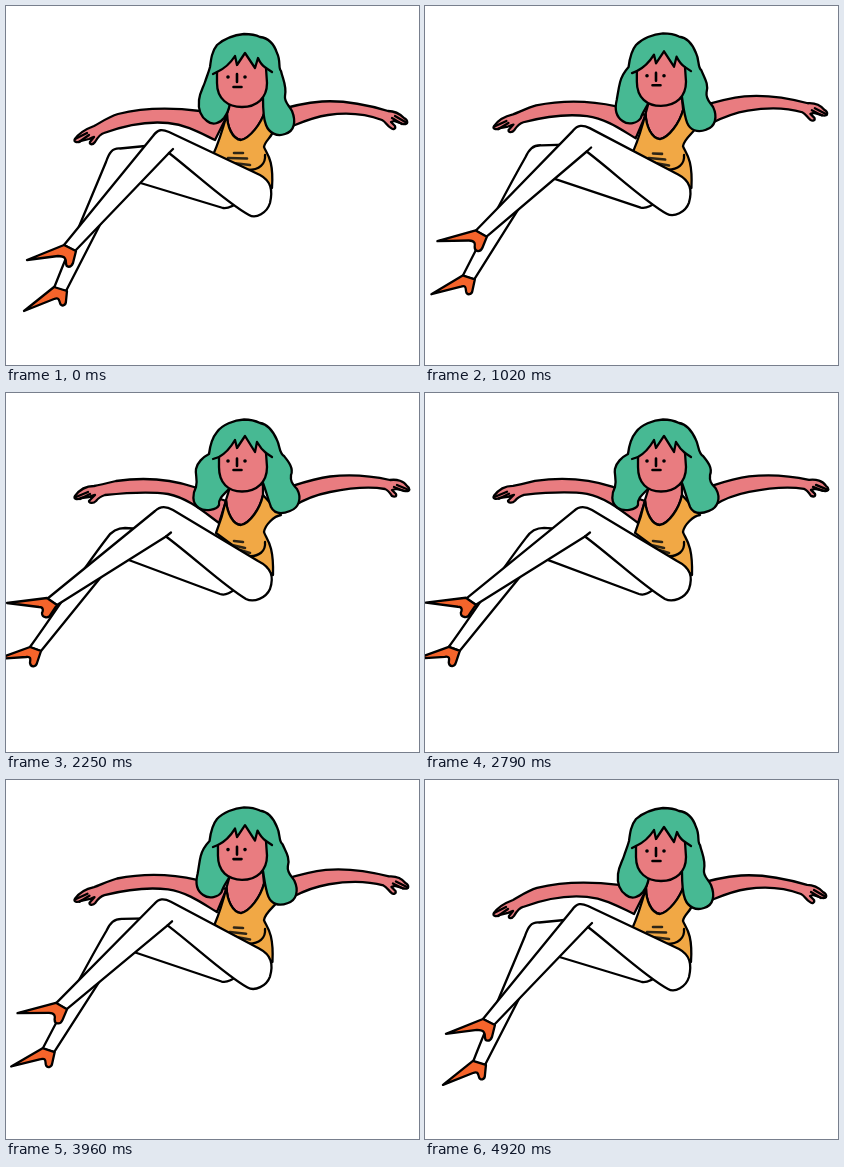
An HTML page for the animation above (4950 ms loop, 413x359 px).

```html
<!DOCTYPE html>
<html lang="en">
<head>
<meta charset="utf-8">
<title>Floating woman</title>
<style>
  html, body { margin: 0; width: 100%; height: 100%; overflow: hidden; background: #fff; }
  svg { display: block; width: 100%; height: 100%; }
  path { stroke: #000; stroke-width: 2.3; stroke-linejoin: round; stroke-linecap: round; }
</style>
</head>
<body>
<svg id="stage" viewBox="0 0 413 359"></svg>
<script>
const SKIN = '#e97c80', HAIR = '#47b993', TOP = '#f1a845', SHOE = '#f5642b', WHITE = '#fff';
const LOOP = 4950, STEP = 30;

// Path numbers written "a>b" move from the low pose a to the high pose b.
const parts = [
  // left arm and fingers
  [SKIN, `M221>220 110>108 C209>208 108>104 202>198 106>99 194>188 105>94
    C170>164 102>86 140>138 101>84 112>110 108>88 C102>102 111>90 94>94 117>92 88>88 120>93
    C80>81 123>93 73>74 127>96 69>69 133>103 C67>67 136>106 71>71 137>107 75>75 135>105
    L83>83 133>104 C86>86 132>103 87>88 131>102 88>89 131>102 L84>83 136>108
    C83>83 139>110 87>87 139>111 89>90 136>108 C92>93 131>104 94>96 128>103 98>99 127>102
    C120>118 119>100 142>142 115>98 162>162 117>101 C182>182 119>105 196>198 128>119 209>213 134>130 Z`],
  ['none', 'M69>70 133>104 L81>82 127>99 M73>74 136>106 L83>84 129>101'],
  // right arm and fingers
  [SKIN, `M270 105>98 C282>288 101>93 298>304 97>86 316>324 95.5>83.5
    C340>346 94>81 362>366 99>83 382>384 105>87 C388>391 105>86 393>398 107>88 398>401 112>93
    C402>404 114>95 403>405 119>99 397>399 118>98 L388>390 115>96 L385>386 116>97
    L389>390 120>101 C390>391 123>104 387>388 124>104 385>386 122>103 C381>384 120>100 380>382 116>97 376>379 114>96
    C360>362 108>93 342>344 106>95 322>324 109>99 C307>309 111>102 294>297 117>107 284>288 121>113 L270 122>114 Z`],
  ['none', 'M401>403 117>97 L389>391 110>92 M396>398 118>98 L386>388 112>94'],
  // back leg and shoe
  [WHITE, `M48>24 282>254 C66>48 236>221 86>74 190>180 100>101 156>145
    C103>105 147>139 106>110 142>135 114>119 142.5>135 L160>165 138 L235 194>192
    C229>224 199>200 223>220 203 217>214 202>201 L118>112 172>163 L60>35 285>258 Z`],
  [SHOE, `M48>24 281>254 L18>-9 305>266 L48>20 293>264 C53>26 291>263 53>24 294>267 54>24 297>270
    C55>25 301>275 60>30 300>274 60>31 295>270 L61>35 285>258 Z`],
  // chest and top
  [SKIN, `M224 96>94 L221>220 108>107 C221 120 226>227 133>132 235 134>132
    C244 132>130 255>254 118>116 259>257 105>102 L257 93>91 Z`],
  [TOP, `M221>220 108>107 C221 120 226>227 133>132 235 134>132
    C244 132>130 255>254 118>116 259>257 105>102 L268>275 122
    C267>268 131>123 259 134>132 258 141>139 C260 147>146 268 152>150 266>267 182
    L207>210 149>140 C212>214 138>130 216>217 126>121 221>220 108>107 Z`],
  ['none', 'M259 149 C260 158 253 164 242 164>163'],
  ['none', 'M228 147>148 L237 147>149 M222>226 152 L241>239 152.5>155 M227>234 157 L244 159>160', 2.6, '#2d2517'],
  // front leg and shoe
  [WHITE, `M58>41 239>206 L147>149 130>118 C152>154 123>113 156>160 123>113 163>167 126>117
    L254>252 169>168 C265>266 175 267>268 184 264 197>196
    C261>260 207>205 250>248 213>210 243>240 209>206 C222>218 198>193 190 168>166 163>160 147>143.5
    L69>51 245>212 Z`],
  ['none', 'M163>160 147>143.5 L167>165 143>139.5'],
  [SHOE, `M58>41 239>205 L21>1 254>210 L52>33 250>214 C60>38 250>214 60>37 254>218 60>36 257>220
    C60>36 262>225 65>43 262>226 67>45 257>221 L70>51 245>212 Z`],
  // hair
  [HAIR, `M238 28>26.5 C228 29>27 218>216 33>32 211 39 C206 45 205>204 53 204>203 61
    C203>197 65>64 201>191 70 199>190 76 C197>189 82 194>192 86 193>190 94
    C192>187 103>100 194>185 110 201>193 115 C207>199 120>119 214>211 117 218>213 112
    C221>212 108>106 223>217 104>102 224 97>95 L250 90>88 L257 92>90
    C257>260 101>98 257>262 112>106 260>265 119>114 C263>268 127>120 271>274 131>122 279>284 128>118
    C289>293 125>115 290>296 115>105 286>291 105>96 C283>288 99>92 278>284 96>90 279>285 90>82
    C281>288 80>75 277>282 74>68 275>278 65>63 C272>273 62>60 275>274 55>53 271 47
    C268>267 38 263>261 32>31 254 31>30 C250 29>28 244 28>26.5 238 28>26.5 Z`],
  // face and fringe
  [SKIN, `M211>213 66>64 Q222 61>59 229 50>47 L231 59>55 L239 47>43 L249 62>59 L252>251 52>49
    Q255 59>56 260 62>60 L261 77>74 C261 92>89 251 101>98.5 236 101>98.5
    C222 101>98.5 211>213 93>90 211>213 77>74 Z`],
  ['none', 'M211>213 66>64 L207 68>66 M260 62>60 L266 66>64'],
  ['none', 'M222 71>68 h.01 M239 71>68 h.01', 3.6],
  ['none', 'M231 68>65.5 V76>73 M227.5 81>77 H235.5', 2.6]
];

const stage = document.getElementById('stage');
const drawn = parts.map(([fill, shape, width, color]) => {
  const node = document.createElementNS('http://www.w3.org/2000/svg', 'path');
  node.setAttribute('fill', fill);
  if (width) node.style.strokeWidth = width;
  if (color) node.style.stroke = color;
  stage.append(node);
  return { node, shape };
});

// Lift over one loop: a quick turn below, a softer one above.
const keys = [[0, 0], [1020, .43], [1470, .63], [2250, 1], [2550, 1.05], [3300, .85], [3960, .475]];
const key = i => {
  const n = keys.length, turn = Math.floor(i / n), [t, v] = keys[i - turn * n];
  return [t + turn * LOOP, v];
};
const slope = i => {
  const [a, u] = key(i - 1), [b, v] = key(i + 1);
  return (v - u) / (b - a);
};

function lift(t) {
  let i = keys.length - 1;
  while (keys[i][0] > t) i--;
  const [a, u] = key(i), [b, v] = key(i + 1);
  const d = b - a, s = (t - a) / d, r = 1 - s;
  return u * r * r * (1 + 2 * s) + v * s * s * (3 - 2 * s)
    + d * s * r * (slope(i) * r - slope(i + 1) * s);
}

function draw(now) {
  const p = lift(Math.floor(now % LOOP / STEP) * STEP);
  for (const { node, shape } of drawn) {
    node.setAttribute('d', shape.replace(/(-?[\d.]+)>(-?[\d.]+)/g,
      (_, a, b) => (+a + (b - a) * p).toFixed(2)));
  }
}

const start = performance.now();
function tick() {
  draw(performance.now() - start);
  requestAnimationFrame(tick);
}
tick();
</script>
</body>
</html>
```
